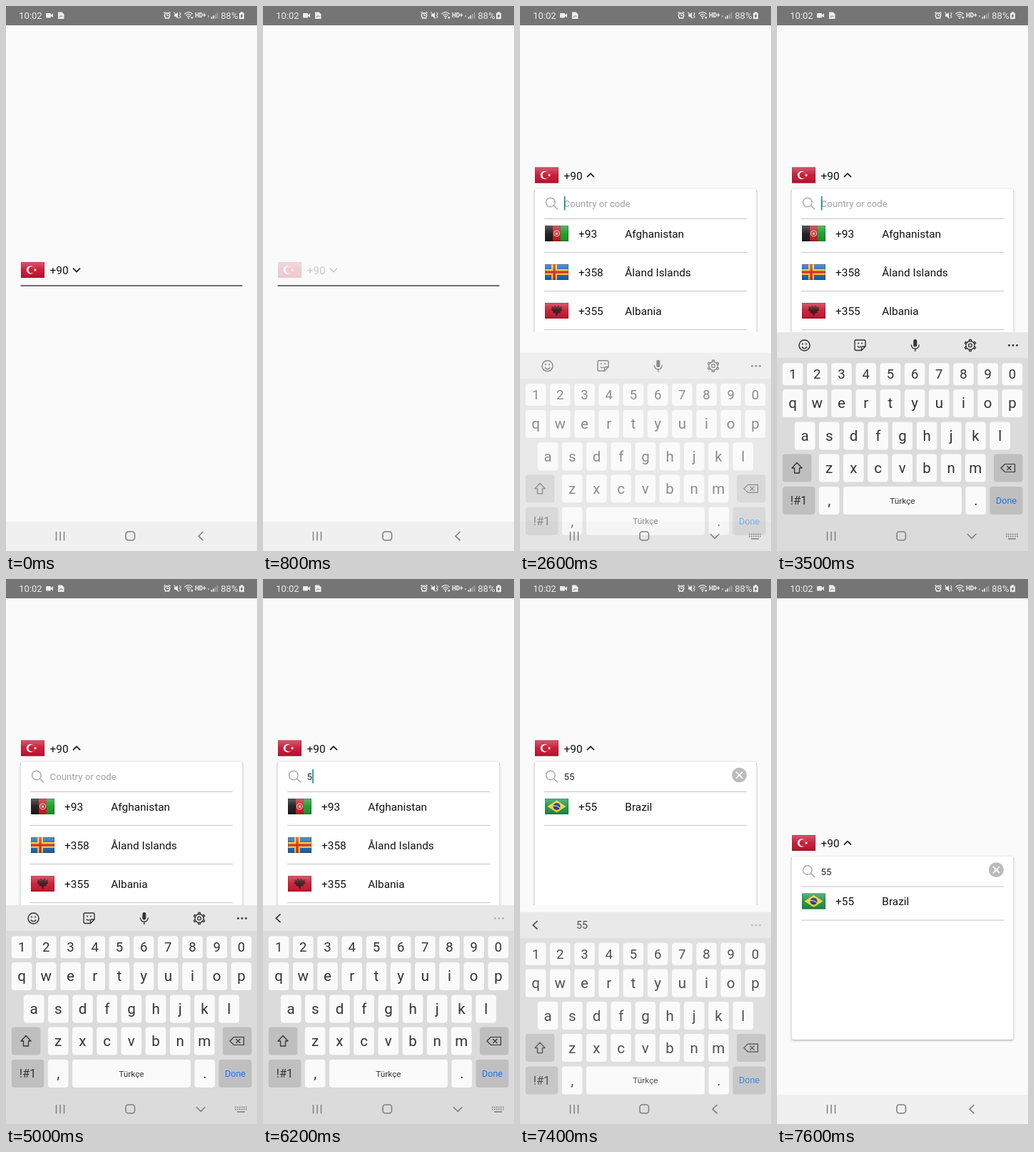
Recreate the animation shown at these times as an HTML page. Size 352 px wide and 762 px high, loop 8 s.

```html
<!DOCTYPE html>
<html lang="en">
<head>
<meta charset="utf-8">
<title>Phone code picker</title>
<style>
html, body { margin: 0; width: 100%; height: 100%; overflow: hidden; background: #fafafa; }
svg { display: block; width: 352px; height: 762px; font-family: Roboto, "Noto Sans", sans-serif; }
#panelBox { filter: drop-shadow(0 1px 1.5px rgba(0, 0, 0, .35)); }
</style>
</head>
<body>
<svg id="stage" viewBox="0 0 352 762"></svg>
<script>
const text = (x, y, s, size, fill = '#111', more = '') =>
  `<text x="${x}" y="${y}" font-size="${size}" fill="${fill}" ${more}>${s}</text>`;
const rect = (x, y, w, h, fill, more = '') =>
  `<rect x="${x}" y="${y}" width="${w}" height="${h}" fill="${fill}" ${more}/>`;
const line = (d, color, w = 1.5, more = '') =>
  `<path d="${d}" fill="none" stroke="${color}" stroke-width="${w}" ${more}/>`;
const shape = (d, fill) => `<path d="${d}" fill="${fill}"/>`;
const disc = (x, y, r, fill, more = '') => `<circle cx="${x}" cy="${y}" r="${r}" fill="${fill}" ${more}/>`;
const group = (id, body, more = '') => `<g id="${id}" ${more}>${body}</g>`;
const MID = 'text-anchor="middle"';

function star(cx, cy, r, fill) {
  let d = '';
  for (let i = 0; i < 10; i++) {
    const a = Math.PI * (1 + i / 5), q = i % 2 ? r * .4 : r;
    d += (i ? 'L' : 'M') + (cx + q * Math.cos(a)).toFixed(2) + ' ' + (cy + q * Math.sin(a)).toFixed(2);
  }
  return shape(d + 'Z', fill);
}

// Flags, drawn in a 33 x 22 box
const flags = {
  tr: rect(0, 0, 33, 22, '#c8102e') + disc(13.5, 11, 5.8, '#fff') + disc(15.2, 11, 4.7, '#c8102e') + star(20, 11, 2.6, '#fff'),
  af: rect(0, 0, 11, 22, '#161616') + rect(11, 0, 11, 22, '#c01a20') + rect(22, 0, 11, 22, '#139a24') +
    disc(16.5, 11, 4, 'none', 'stroke="#eeb9b4" stroke-width="1.2"') + rect(14.8, 9.5, 3.4, 3.5, '#e8b0aa'),
  ax: rect(0, 0, 33, 22, '#1664ae') + rect(9, 0, 8, 22, '#f5c62c') + rect(0, 7, 33, 8, '#f5c62c') +
    rect(11.4, 0, 3.2, 22, '#d0202c') + rect(0, 9.4, 33, 3.2, '#d0202c'),
  al: rect(0, 0, 33, 22, '#cc1430') +
    shape('M16.5 6L14 3.5L12.5 5L14.5 7L9.5 5L9 11L12 12L10.5 14L14.5 14.5L16.5 19L18.5 14.5L22.5 14L21 12L24 11L23.5 5L18.5 7L20.5 5L19 3.5Z', '#3a1014'),
  dz: rect(0, 0, 16.5, 22, '#16873c') + rect(16.5, 0, 16.5, 22, '#f4f4f4') +
    line('M20.3 7.6A5 5 0 1 0 20.3 14.4A4.4 4.4 0 1 1 20.3 7.6', '#d0202c', 1) + star(19.5, 11, 2.4, '#d0202c'),
  br: rect(0, 0, 33, 22, '#169448') + shape('M16.5 2.5L29.5 11L16.5 19.5L3.5 11Z', '#f7d325') + disc(16.5, 11, 5, '#25357f') +
    line('M11.8 10Q17 9.5 21 13', '#fff', 1)
};
const flag = (id, x, y) => `<g transform="translate(${x} ${y})">${flags[id]}${rect(0, 0, 33, 22, 'url(#gloss)')}` +
  rect(.4, .4, 32.2, 21.2, 'none', 'stroke="#000" stroke-opacity=".22" stroke-width=".8"') + '</g>';

// Picker
const rule = y => rect(34, y, 284, 1, '#c4c4c4');
const item = ([id, code, name], i) => {
  const y = 451 + 54 * i;
  return flag(id, 35, y - 11.5) + text(82, y + 5.3, code, 15.4) + text(147.3, y + 5.3, name, 15.4) + rule(y + 25.6);
};
const countries = [['af', '+93', 'Afghanistan'], ['ax', '+358', 'Åland Islands'], ['al', '+355', 'Albania'], ['dz', '+213', 'Algeria']];

const head = group('head', flag('tr', 21, 358) + text(61.5, 375, '+90', 15.4) +
  group('caret', line('M94 366.6L99 371.6L104 366.6', '#111', 1.6)));
const panel = group('panel',
  rect(20.5, 388, 311, 256, '#fff', 'rx="3" id="panelBox"') +
  disc(42.8, 407, 6.3, 'none', 'stroke="#aaa" stroke-width="1.5"') + line('M47.3 411.5L53 417', '#aaa', 1.6) +
  text(61.6, 413.6, '', 13.2, '#a0a0a0', 'id="query"') +
  rect(61.8, 398.5, 1.6, 19.5, '#0b8a72', 'id="cursor"') +
  group('clear', disc(307.5, 406.7, 10.4, '#bbb') + line('M303 402.2L312 411.2M312 402.2L303 411.2', '#fff', 1.7)) +
  rule(429.5) + group('all', countries.map(item).join('')) + group('found', item(['br', '+55', 'Brazil'], 0)));

// Status bar
const W = '#ececec';
const status = rect(0, 0, 352, 27, '#757575') + text(18.3, 17.7, '10:02', 13, W) +
  rect(56, 10, 7, 6.5, W, 'rx="1"') + shape('M63 12.5L66 10.2V16.2L63 14Z', W) +
  shape('M73 8.5H78.5L81.5 11.5V18H73Z', W) + line('M75 16L77 13.5L78.5 15L79.5 14', '#757575', 1) +
  disc(226, 13.3, 3.6, 'none', `stroke="${W}" stroke-width="1.6"`) + line('M226 11V13.5H228M221.5 10L223.5 8.3M230.5 10L228.5 8.3M223 18L224 16.5M229 18L228 16.5', W, 1.2) +
  shape('M236 11.5H238L241 8.8V17.2L238 14.8H236Z', W) + line('M235.5 8.5L242 17.5M243.5 9L245 11L243.5 13L245 15L243.5 17', W, 1.1) +
  line('M250.3 11.2Q256 6.2 261.7 11.2M252.3 13.3Q256 10 259.7 13.3M254 15.2Q256 13.6 258 15.2', W, 1.2) + disc(256, 17, 1, W) + rect(259.5, 15, 2.6, 2.5, W) +
  text(265, 16, 'HD+', 8.2, W, 'font-weight="800"') + rect(283.5, 13, 1, 2.5, W) +
  [0, 1, 2, 3].map(i => rect(287.5 + i * 2.7, 15.2 - i * 2, 1.7, 2.6 + i * 2, i < 2 ? W : '#a4a4a4')).join('') +
  text(301.3, 17.7, '88%', 13, W) + rect(327, 9.5, 7, 8.8, W, 'rx="1"') + rect(329, 8.3, 3, 2, W) + shape('M331.5 10.5L328.5 14.5H330.2L329.5 17.5L332.5 13.3H330.8Z', '#555');

// Keyboard
const INK = '#333', SOFT = '#fafafa', DARK = '#bfbfbf';
const key = (x, y, w, h, label = '', size = 20, fill = SOFT, ink = INK, id = '') =>
  rect(x, y - h / 2, w, h, fill, `rx="4" ${id}`) + text(x + w / 2, y + size * .34, label, size, ink, MID);
const keyRow = (chars, x, y, h, size) => [...chars].map((c, i) =>
  key(x + 34.2 * i, y, 28.6, h, c, size, SOFT, INK, c === '5' ? 'id="five"' : '')).join('');
const dots = color => [325.5, 331, 336.5].map(x => disc(x, 474.5, 1.4, color)).join('');
const spokes = [0, 1, 2, 3, 4, 5].map(i =>
  `<path d="M269.3 468.6L269.9 466.4H272.1L272.7 468.6" transform="rotate(${i * 60} 271 474.5)"/>`).join('');
const tools = group('tools',
  disc(38.5, 474.5, 7.5, 'none', `stroke="${INK}" stroke-width="1.5"`) + disc(36, 472.5, 1.1, INK) + disc(41, 472.5, 1.1, INK) +
  line('M34.8 476.5Q38.5 481.3 42.2 476.5', INK, 1.4) +
  line('M110.5 467H122Q124 467 124 469V476L118.5 481.5H111Q109 481.5 109 479.5V469Q109 467 110.5 467ZM124 476H120Q118.5 476 118.5 478V481.5M112.8 475.5Q115 478.5 117.5 476', INK, 1.4) +
  disc(114, 471.5, 1, INK) + disc(119, 471.5, 1, INK) +
  rect(191.3, 466, 5, 10.5, INK, 'rx="2.5"') + line('M188.3 473.5Q188.8 479.2 193.8 479.2T199.3 473.5M193.8 479V483', INK, 1.4) +
  `<g fill="none" stroke="${INK}" stroke-width="1.4">${spokes}</g>` +
  disc(271, 474.5, 6, 'none', `stroke="${INK}" stroke-width="1.3"`) + disc(271, 474.5, 2.4, 'none', `stroke="${INK}" stroke-width="1.3"`) +
  dots(INK));
const hints = group('hints', line('M24.5 468.5L18.3 474.3L24.5 480.1', INK, 1.7) + text(79, 479.3, '', 14.3, INK, 'id="hint"') + dots('#b0b0b0'));
const keyboard = group('keyboard',
  rect(0, 456, 352, 36, '#e7e7e7') + rect(0, 492, 352, 340, '#dbdbdb') + tools + hints +
  keyRow('1234567890', 7.8, 514.7, 31, 18.5) + keyRow('qwertyuiop', 7.8, 555.5, 39, 20.5) +
  keyRow('asdfghjkl', 24.8, 601, 39, 20.5) + keyRow('zxcvbnm', 58.8, 646, 39, 20.5) +
  key(7.8, 646, 40.5, 39, '', 18, DARK) + line('M28 638.5L35 646H31.5V653H24.5V646H21Z', INK, 1.3, 'stroke-linejoin="round"') +
  key(304, 646, 40.5, 39, '', 18, DARK) + line('M314 646L319.5 640.5H333.5V651.5H319.5ZM322.5 643L328.5 649M328.5 643L322.5 649', INK, 1.2) +
  key(7.8, 691.5, 45.5, 39, '!#1', 16.5, DARK) + key(58.8, 691.5, 28.6, 39, ',') + key(93, 691.5, 166, 39, 'Türkçe', 11.8) +
  key(264.5, 691.5, 28.6, 39, '.') + key(298.5, 691.5, 46, 39, 'Done', 12.6, DARK, '#1877ea'));

// Navigation bar
const G = '#808080';
const nav = line('M70.5 735V747.5M76 735V747.5M81.5 735V747.5', G, 1.5) +
  rect(168, 735, 12.5, 12, 'none', `rx="3.5" stroke="${G}" stroke-width="1.6"`) +
  group('back', line('M276.5 735L270 741.2L276.5 747.4', G, 1.6)) +
  group('hide', line('M267 738.2L273.2 744.4L279.4 738.2', G, 1.6) +
    line('M321 738.5H338M321 741.5H338', G, 1.6, 'stroke-dasharray="1.8 1.2"') + line('M324 745H335', G, 1.6));

stage.innerHTML = `<defs>
  <linearGradient id="gloss" x2="0" y2="1"><stop stop-color="#fff" stop-opacity=".3"/><stop offset=".5" stop-color="#fff" stop-opacity=".06"/><stop offset="1" stop-opacity=".12"/></linearGradient>
  <clipPath id="window">${rect(0, 0, 352, 721, '#000', 'id="view"')}</clipPath></defs>` +
  rect(0, 0, 352, 762, '#fafafa') +
  `<g clip-path="url(#window)">${group('app', head + rect(20.5, 390.4, 311, 1.3, '#222') + panel)}</g>` +
  rect(0, 721, 352, 41, '#f0f0f0') + keyboard + nav + status;

const $ = id => document.getElementById(id);
const set = (id, name, value) => $(id).setAttribute(name, value);
const show = (id, on) => set(id, 'visibility', on ? 'visible' : 'hidden');
const clamp = v => Math.max(0, Math.min(1, v));

const fade = [[2300, 0], [2400, .1], [2600, .55], [2800, 1], [7200, 1], [7400, .85], [7600, 0]];
function keyboardAlpha(t) {
  const i = fade.findIndex(k => k[0] > t);
  if (i < 1) return 0;
  const [t0, a] = fade[i - 1], [t1, b] = fade[i];
  return a + (b - a) * (t - t0) / (t1 - t0);
}

function draw(t) {
  const open = t >= 1100, raised = t >= 2400 && t < 7500;
  const typed = t < 6100 ? '' : t < 6400 ? '5' : '55';
  const filtered = t >= 6600;

  set('head', 'opacity', t < 800 ? 1 : t < 1100 ? .2 : clamp(.2 + .8 * (t - 1100) / 250));
  set('caret', 'transform', open ? 'translate(0 738.2) scale(1 -1)' : '');
  set('panel', 'opacity', clamp((t - 1000) / 500) * open);
  set('app', 'transform', `translate(0 ${raised ? -132.5 : 0})`);
  set('view', 'height', raised ? 456 : 721);

  $('query').textContent = typed || 'Country or code';
  set('query', 'fill', typed ? '#222' : '#a0a0a0');
  set('cursor', 'x', 61.8 + 7.4 * typed.length);
  const blink = t < 3000 || Math.floor((t - 2500) / 500) % 2 === 0;
  show('cursor', t >= 2200 && t < 6900 && (typed || blink));
  show('clear', t >= 6500);
  show('all', !filtered);
  show('found', filtered);

  const a = keyboardAlpha(t);
  set('keyboard', 'opacity', a);
  set('keyboard', 'transform', `translate(0 ${64 * (1 - a)})`);
  show('tools', !typed);
  show('hints', typed);
  $('hint').textContent = t < 6300 ? '' : typed;
  const pressed = t >= 6000 && t < 6100 || t >= 6300 && t < 6400;
  set('five', 'fill', pressed ? '#cacaca' : SOFT);

  const hiding = t >= 2400 && t < 7300;
  show('hide', hiding);
  show('back', !hiding);
}

// The screen refreshes ten times a second
function tick() {
  draw(Math.floor(performance.now() % 8000 / 100) * 100);
  requestAnimationFrame(tick);
}
tick();
</script>
</body>
</html>
```
